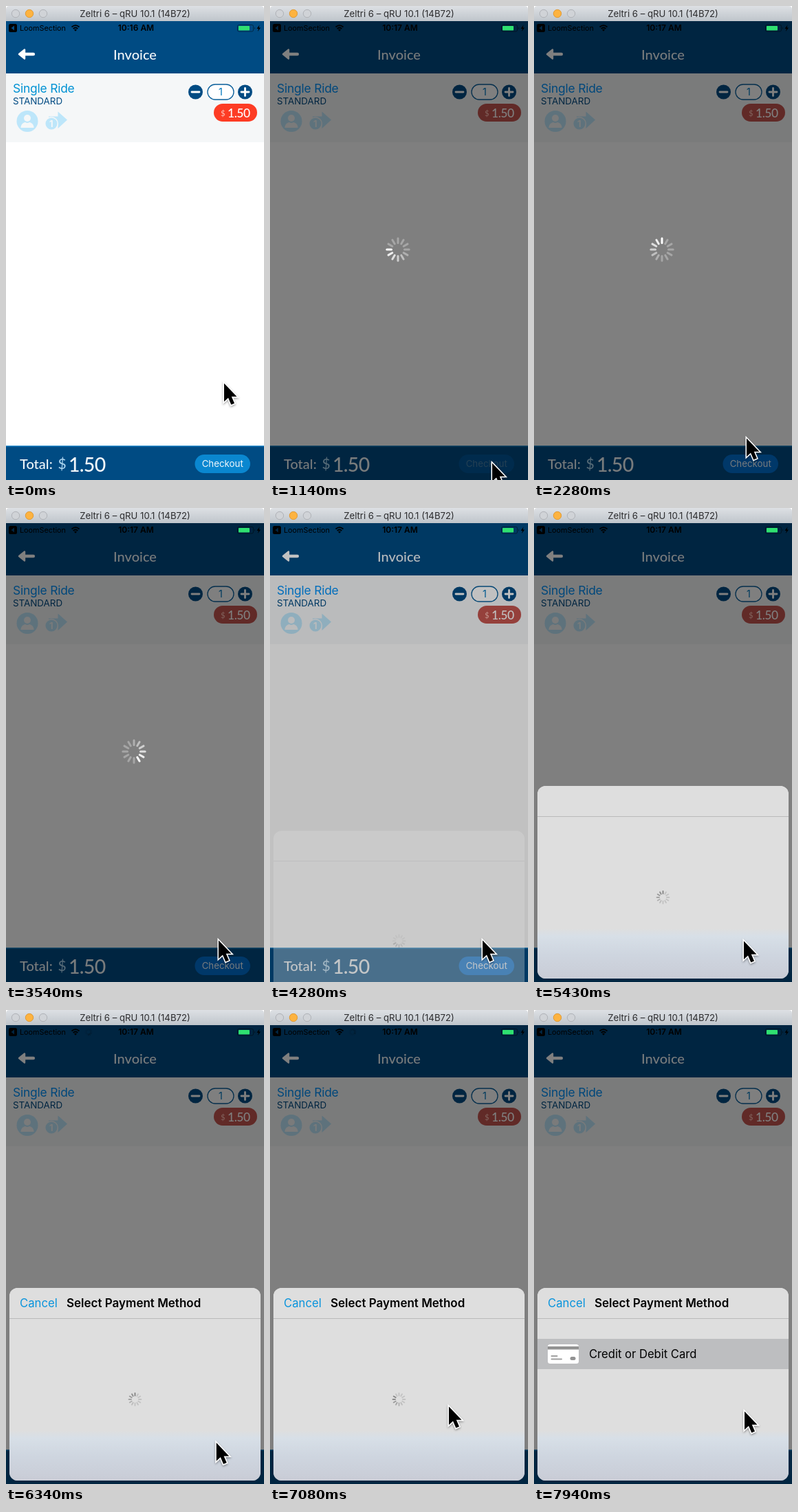
Write an HTML page that moves like this. It is 375 px wide and 689 px high and loops after 8 s.

```html
<!DOCTYPE html>
<html lang="en">
<head>
<meta charset="utf-8">
<title>Invoice checkout</title>
<style>
html, body { margin: 0; width: 100%; height: 100%; overflow: hidden; background: #fff; }
svg { display: block; width: 375px; height: 689px; font-family: Inter, sans-serif; }
.round { font-family: Lato, sans-serif; font-weight: 500; }
</style>
</head>
<body>
<svg viewBox="0 0 375 689" xmlns="http://www.w3.org/2000/svg">
  <defs>
    <linearGradient id="chrome" x2="0" y2="1">
      <stop offset="0" stop-color="#dde0e4"/><stop offset="1" stop-color="#bfc5cb"/>
    </linearGradient>
    <linearGradient id="glass" x2="0" y2="1">
      <stop offset=".74" stop-color="#dedede"/><stop offset=".78" stop-color="#d7dfe7"/>
      <stop offset=".88" stop-color="#ced5df"/><stop offset="1" stop-color="#c9ccd6"/>
    </linearGradient>
    <filter id="shade" x="-50%" y="-50%" width="200%" height="200%">
      <feDropShadow dx="0" dy="1.5" stdDeviation="1.5" flood-opacity=".4"/>
    </filter>
  </defs>

  <rect width="375" height="689" fill="#fff"/>

  <!-- invoice page -->
  <rect y="22" width="375" height="76" fill="#004b83"/>
  <path d="M19 70L27 63.500V76.500Z" fill="#fff" stroke="#fff" stroke-width="2.400" stroke-linejoin="round"/>
  <path d="M24 70H39.800" stroke="#fff" stroke-width="4.600" stroke-linecap="round"/>
  <text class="round" x="187.5" y="78" font-size="20" fill="#f2f7fa" text-anchor="middle">Invoice</text>
  <rect y="98" width="375" height="100" fill="#f5f7f8"/>
  <text id="ride" x="10" y="125.5" font-size="17.4" letter-spacing="-.2">Single Ride</text>
  <text x="10" y="143" font-size="13.4" fill="#004b83">STANDARD</text>
  <g fill="#bde6fa">
    <circle cx="31" cy="167.5" r="15.5"/>
    <path d="M62 160.500H75.500V153.500L89 165.500L75.500 178V171H62Z"/>
    <circle cx="66" cy="171" r="9.300" stroke="#f5f7f8" stroke-width="1.500"/>
  </g>
  <g fill="#f5f7f8">
    <circle cx="31" cy="163" r="5"/>
    <path d="M21.500 177C21.500 172 25 169.500 28 169Q31 171 34 169C37 169.500 40.500 172 40.500 177Z"/>
    <text x="65.700" y="176" font-size="13" font-weight="700" text-anchor="middle">1</text>
  </g>
  <g fill="#004b83">
    <circle cx="275.500" cy="125" r="10.500"/><circle cx="347.500" cy="125" r="10.500"/>
  </g>
  <path d="M270 125H281M342 125H353M347.500 119.500V130.500" stroke="#fff" stroke-width="2.800" stroke-linecap="round"/>
  <rect x="293" y="114" width="38" height="22" rx="11" fill="#fff" stroke="#0a5f9b" stroke-width="1.300"/>
  <text x="312" y="130" font-size="14.500" fill="#0077bd" text-anchor="middle">1</text>
  <rect id="price" x="302" y="142" width="63" height="26" rx="13"/>
  <text class="round" x="312" y="160" font-size="11.500" fill="#ffc0b5">$</text>
  <text class="round" x="322" y="161.500" font-size="17.500" letter-spacing="-.5" fill="#fff">1.50</text>

  <rect y="639" width="375" height="50" fill="#004b83"/>
  <rect y="639" width="375" height="1.500" fill="#1683c6"/>
  <g class="round" fill="#f2f7fa">
    <text x="20" y="672.500" font-size="20">Total:</text>
    <text x="75.500" y="673" font-size="21" fill="#a9d3ee">$</text>
    <text x="91" y="676.500" font-size="28.500" letter-spacing="-.700">1.50</text>
  </g>
  <g id="button">
    <rect id="pill" x="274.500" y="652" width="80.500" height="27" rx="13.500"/>
    <text x="314.700" y="670" font-size="13.300" fill="#f2f8fc" text-anchor="middle">Checkout</text>
  </g>

  <rect id="dim" y="22" width="375" height="667"/>
  <g id="busy" transform="translate(186 354)" stroke="#fff" stroke-width="3"></g>

  <!-- payment sheet -->
  <g id="sheet">
    <rect x="5" width="365" height="280" rx="12" fill="#dedede"/>
    <rect id="tint" x="5" width="365" height="280" rx="12" fill="url(#glass)"/>
    <rect x="5" y="44" width="365" height="1" fill="#b9b9ba"/>
    <g id="heading" font-size="17">
      <text x="20" y="28" font-size="16.700" fill="#0a94dc">Cancel</text>
      <text x="88" y="28" font-weight="600">Select Payment Method</text>
    </g>
    <g id="wait" transform="translate(187.500 162)" stroke="#777" stroke-width="1.800"></g>
    <g id="option">
      <rect id="row" x="5" y="74" width="365" height="44"/>
      <rect x="20" y="82" width="45" height="28" rx="3.500" fill="#fff"/>
      <rect x="20" y="85" width="45" height="4.500" fill="#929292"/>
      <path d="M25.500 99H33.500M25.500 103.500H40" stroke="#a0a0a0" stroke-width="2" stroke-linecap="round"/>
      <rect x="52.500" y="100" width="8" height="5" rx="2.500" fill="#929292"/>
      <text x="80" y="101.500" font-size="16.600">Credit or Debit Card</text>
    </g>
  </g>

  <!-- status bar -->
  <rect x="4" y="26" width="12" height="12" rx="2.500"/>
  <path id="back" d="M12 28.500L7.500 32L12 35.500Z"/>
  <text x="20" y="36" font-size="10.800">LoomSection</text>
  <g fill="none" stroke="#000" stroke-width="1.700">
    <path d="M95.500 30.500Q101 25.800 106.500 30.500M97.700 33Q101 30 104.300 33"/>
  </g>
  <path d="M101 36.800L99 34.500Q101 33 103 34.500Z"/>
  <g id="net" transform="translate(120 32)" stroke="#000" stroke-width="1.100"></g>
  <text id="clock" x="189" y="36" font-size="12" font-weight="600" text-anchor="middle"></text>
  <g opacity=".45">
    <rect x="336.500" y="27.500" width="23" height="9.500" rx="2" fill="none" stroke="#000"/>
    <path d="M361 30.500Q363 32.200 361 34Z"/>
  </g>
  <rect x="338" y="29" width="16" height="6.500" rx=".8" fill="#2fe070"/>
  <path d="M368.500 27.500L364.500 33H367L366 37L370 31.500H367.500Z"/>

  <!-- window bar -->
  <path d="M0 22V5Q0 0 5 0H370Q375 0 375 5V22Z" fill="url(#chrome)"/>
  <g fill="#d0d3d7" stroke="#b0b3b8">
    <circle cx="14" cy="11" r="5.700"/>
    <circle cx="34" cy="11" r="5.700" fill="#fdb340" stroke="#e09b35"/>
    <circle cx="54" cy="11" r="5.700"/>
  </g>
  <text x="187.500" y="16" font-size="13.200" fill="#2c2c2e" text-anchor="middle">Zeltri 6 – qRU 10.1 (14B72)</text>

  <g id="cursor" filter="url(#shade)">
    <path d="M1 1.500V28L7 22.500L11.300 32.500L16 30.500L11.800 20.800H19.500Z" stroke="#fff" stroke-width="3" paint-order="stroke"/>
  </g>
</svg>
<script>
const LOOP = 8000, SPOKES = 12, TICK = 75;
const LIGHT = { ride: "#0092d4", price: "#fd3c24", pill: "#0a87d0", back: "#004b83" };
const DARK = { ride: "#0090f8", price: "#c4544e", pill: "#0070d4", back: "#002541" };

const $ = id => document.getElementById(id);
const set = (id, attrs) => {
  for (const k in attrs) $(id).setAttribute(k, attrs[k]);
};
const ramp = (t, a, b) => Math.min(1, Math.max(0, (t - a) / (b - a)));
const ease = p => p * p * (3 - 2 * p);

// keys: [time, ...values]
function track(keys, t, curve = ease) {
  const i = keys.findIndex(k => k[0] > t);
  if (i < 0) return keys[keys.length - 1].slice(1);
  if (i === 0) return keys[0].slice(1);
  const a = keys[i - 1], b = keys[i], p = curve(ramp(t, a[0], b[0]));
  return a.slice(1).map((v, n) => v + (b[n + 1] - v) * p);
}

const pointer = [
  [230, 316, 547], [400, 320, 650], [570, 320, 650], [740, 322, 663],
  [1200, 322, 663], [1920, 308, 627], [4510, 308, 627], [5300, 304, 628],
  [6300, 304, 628], [6600, 319, 620], [7060, 259, 575], [7140, 259, 575],
  [7430, 264, 505], [7580, 264, 505], [7900, 305, 582]
];
// top edge and height
const slide = [[4120, 689, 280], [4280, 470, 277], [4450, 400, 273], [4750, 404, 280]];

function makeSpinner(id, inner, outer) {
  const lines = [];
  for (let i = 0; i < SPOKES; i++) {
    const line = document.createElementNS("http://www.w3.org/2000/svg", "line");
    line.setAttribute("y1", -inner);
    line.setAttribute("y2", -outer);
    line.setAttribute("stroke-linecap", "round");
    line.setAttribute("transform", `rotate(${i * 360 / SPOKES})`);
    lines.push($(id).appendChild(line));
  }
  return head => lines.forEach((line, i) => {
    const age = ((head - i) % SPOKES + SPOKES) % SPOKES;
    line.setAttribute("opacity", Math.max(.3, 1 - age / 8));
  });
}
const spinBusy = makeSpinner("busy", 9.5, 16.2);
const spinWait = makeSpinner("wait", 5.5, 9);
const spinNet = makeSpinner("net", 2.8, 4.8);

function draw(t) {
  const loading = t >= 1140 && t < 3710;
  const dim = loading ? .5 : .5 * ramp(t, 4050, 4525);
  const tick = Math.floor((t - 1140) / TICK + .01);

  set("dim", { opacity: dim });
  const colors = dim > .2 ? DARK : LIGHT;
  for (const id in colors) set(id, { fill: colors[id] });
  set("button", { opacity: t < 970 ? 1 : .3 + .7 * ramp(t, 1200, 1500) });
  $("clock").textContent = t < 640 ? "10:16 AM" : "10:17 AM";

  set("busy", { opacity: loading ? 1 : 0 });
  spinBusy(tick + 9);

  const [top, height] = track(slide, t, p => p * (2 - p));
  set("sheet", {
    opacity: ramp(t, 4150, 4550),
    transform: `translate(0 ${top}) scale(1 ${height / 280})`
  });
  set("tint", { opacity: ramp(t, 4550, 4850) });
  set("heading", { opacity: ramp(t, 5550, 5750) });
  set("wait", { opacity: t < 7220 ? .9 : 0 });
  spinWait(tick + 15);
  set("option", { opacity: t < 7220 ? 0 : 1 });
  set("row", { fill: t < 7500 ? "#f0f0f0" : "#bdbec0" });
  set("net", { opacity: t > 5500 && t < 7140 ? .35 : 0 });
  spinNet(tick + 9);

  const [x, y] = track(pointer, t);
  set("cursor", { transform: `translate(${x} ${y})` });
}

function frame() {
  draw(performance.now() % LOOP);
  requestAnimationFrame(frame);
}
frame();
</script>
</body>
</html>
```
